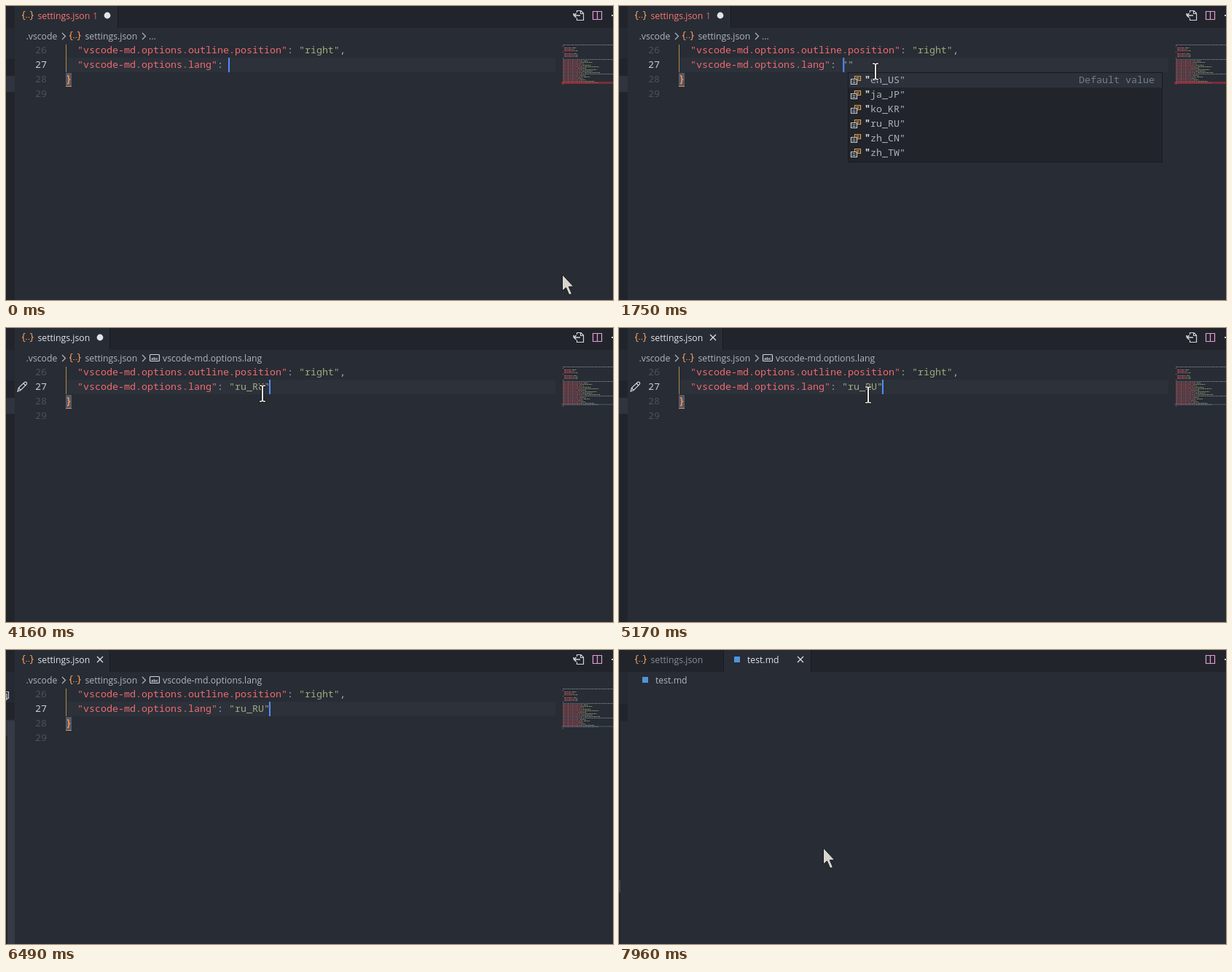
An HTML page that plays this animation: 833 px wide and 404 px high, repeating every 8 s.

```html
<!DOCTYPE html>
<html lang="en">
<head>
<meta charset="utf-8">
<title>Editor settings</title>
<style>
  html, body { margin: 0; width: 100%; height: 100%; overflow: hidden; background: #282c34; }
  svg { display: block; width: 100vw; height: 100vh; }
  text { white-space: pre; }
  .ui { font: 12.25px "Open Sans", "Noto Sans", sans-serif; fill: #b0b6c1; }
  .code { font: 500 13.333px "Noto Sans Mono", "DejaVu Sans Mono", monospace; fill: #abb2bf; }
  .key { fill: #ef6b70; }
  .str { fill: #9dab7e; }
  .num { fill: #495162; }
  .tab { fill: #e2e4e8; }
  .italic { font-style: italic; }
  .line { fill: none; stroke-width: 1.2; }
</style>
</head>
<body>
<svg viewBox="0 0 833 404" preserveAspectRatio="none">
  <defs>
    <g id="braces" class="line" stroke="#ee9a5c" stroke-width="1.5">
      <path d="M5 -5.5H4Q2.5 -5.5 2.5 -4V-2Q2.5 0 .5 0Q2.5 0 2.5 2V4Q2.5 5.5 4 5.5H5M11.5 -5.5H12.5Q14 -5.5 14 -4V-2Q14 0 16 0Q14 0 14 2V4Q14 5.5 12.5 5.5H11.5"/>
      <path d="M5.8 2.5H7.3M9.2 2.5H10.7"/>
    </g>
    <path id="chevron" class="line" stroke="#b0b6c1" d="M0 -4.5L4.5 0L0 4.5"/>
    <path id="close" class="line" stroke="#e2e4e8" d="M-4 -4L4 4M4 -4L-4 4"/>
    <rect id="fileMark" x="-4" y="-4" width="8" height="8" fill="#4f94dc"/>
    <g id="valueIcon" class="line">
      <path stroke="#e5a04c" d="M5.5 .5H13.5V6.5H5.5ZM7.5 2.5H11.5M7.5 4.5H11.5"/>
      <path fill="#21252b" stroke="#c5c8ce" d="M.5 4.5H8.5V11.5H.5ZM2.5 7H6.5M2.5 9.5H6.5"/>
    </g>
  </defs>

  <rect width="833" height="404" fill="#282c34"/>
  <rect width="833" height="30" fill="#21252b"/>

  <!-- side bar edge -->
  <rect y="30" width="12" height="44" fill="#252931"/>
  <rect y="74" width="12" height="24" fill="#21252b"/>
  <g data-on="0-7190">
    <rect y="73" width="12" height="1" fill="#1e2127"/>
    <rect y="96" width="12" height="308" fill="#21252b"/>
    <rect y="96" width="12" height="22" fill="#2f343e"/>
  </g>
  <g data-on="7190-8000">
    <rect y="98" width="2" height="306" fill="#21252b"/>
    <rect y="316" width="2" height="17" fill="#3a404b"/>
  </g>
  <rect id="slider" x="2" y="98" width="10" height="306" fill="#353a45"/>
  <path data-on="5870-7490" class="line" stroke="#c5c8ce" d="M0 57.5H3.5V66.5H0M0 60.5H1V68.5H0"/>

  <!-- title bar actions -->
  <g data-on="0-7190" class="line" stroke="#d0d3d9">
    <path d="M783.5 9V6.5H789L792.5 10V19.5H783.5V16.5M788.5 6.5V10.5H792.5"/>
    <path stroke-width="1.6" d="M788 13H780Q779 13 779 10M782.5 10L779.5 13L782.5 16"/>
  </g>
  <path class="line" stroke="#e59bd2" d="M805.5 7.5H817.5V18.5H805.5ZM811.5 7.5V18.5"/>
  <rect x="831" y="12" width="2" height="2" fill="#c9ccd2"/>

  <!-- settings.json tab -->
  <g data-on="0-4080">
    <rect x="12" width="141" height="30" fill="#282c34"/>
    <rect x="153" width="1" height="30" fill="#181a1f"/>
    <circle cx="139" cy="13" r="4.4" fill="#e2e4e8"/>
  </g>
  <g data-on="4080-7190">
    <rect x="12" width="130" height="30" fill="#282c34"/>
    <rect x="142" width="1" height="30" fill="#181a1f"/>
    <circle data-on="4080-5100" cx="129" cy="13" r="4.4" fill="#e2e4e8"/>
    <use data-on="5100-7190" href="#close" x="129" y="13"/>
  </g>
  <use href="#braces" x="21.5" y="13"/>
  <g id="tabTitle">
    <text class="ui" x="43.5" y="18" style="fill:inherit">settings.json</text>
    <text data-on="0-4080" class="ui" x="119" y="18" style="fill:inherit" opacity=".8">1</text>
  </g>

  <!-- test.md view -->
  <g data-on="7190-8000">
    <rect x="143" width="1" height="30" fill="#181a1f"/>
    <rect x="144" width="119" height="30" fill="#282c34"/>
    <rect x="263" width="1" height="30" fill="#181a1f"/>
    <use href="#fileMark" x="162" y="13"/>
    <g data-on="7190-7270"><text class="ui tab italic" x="176" y="18">test.md</text></g>
    <g data-on="7270-8000"><text class="ui tab" x="176" y="18">test.md</text></g>
    <use href="#close" x="249" y="13"/>
    <use href="#fileMark" x="36" y="41"/>
    <text class="ui" x="50" y="46">test.md</text>
  </g>

  <!-- settings.json view -->
  <g data-on="0-7190">
    <text class="ui" x="27.5" y="46">.vscode</text>
    <use href="#chevron" x="77" y="41.5"/>
    <use href="#braces" x="86.5" y="41"/>
    <text class="ui" x="108.5" y="46">settings.json</text>
    <use href="#chevron" x="187" y="41.5"/>
    <text data-on="0-2000" class="ui" x="196" y="46">...</text>
    <g data-on="2000-7190">
      <rect class="line" x="197.5" y="36.5" width="13" height="9" rx="1" stroke="#d0d3d9"/>
      <text x="199" y="43.5" style="font:bold 5.5px 'Open Sans',sans-serif" fill="#d0d3d9">abc</text>
      <text class="ui" x="215" y="46">vscode-md.options.lang</text>
    </g>

    <rect x="83" y="71" width="671" height="20" fill="#2c313a"/>
    <rect x="82" y="53" width="1" height="38" fill="#b08a4c"/>
    <rect x="82" y="92" width="8" height="18" fill="#515a6b"/>
    <rect x="82" y="110" width="8" height="1" fill="#e08a4a"/>
    <g class="code">
      <g class="num">
        <text x="40" y="65">26</text>
        <text x="40" y="85" fill="#c8ccd4">27</text>
        <text x="40" y="105">28</text>
        <text x="40" y="125">29</text>
      </g>
      <text x="98" y="65"><tspan class="key">"vscode-md.options.outline.position"</tspan>: <tspan class="str">"right"</tspan>,</text>
      <text x="98" y="85"><tspan class="key">"vscode-md.options.lang"</tspan>: <tspan id="value" class="str"></tspan></text>
      <text x="82" y="105" fill="#fa8c4a" font-weight="700">}</text>
    </g>
    <path id="squiggle" data-on="2000-4080" class="line" stroke="#c9a564"/>
    <path data-on="2000-5400" class="line" stroke="#d0d3d9" stroke-width="1.4"
      d="M16 87L17.5 82L25.5 74.5Q27 73.5 28.3 75Q29.2 76.5 28 77.7L20 85.5ZM24 76L26.8 79M17.5 82L20 85.5"/>

    <g id="minimap" opacity=".75"></g>
    <rect data-on="0-2150" x="762" y="104" width="71" height="3" fill="#a3303c" opacity=".65"/>
    <rect data-on="2150-7190" x="762" y="104" width="71" height="2" fill="#4a6283" opacity=".45"/>
    <rect data-on="2150-4080" x="790" y="104" width="4" height="2" fill="#d6bd72"/>
    <g id="popups"></g>
    <rect id="caret" y="71" width="2" height="20" fill="#528bff"/>
  </g>

  <g id="mouse" stroke="#15171b">
    <path id="ibeam" fill="#f0ece4" d="M-4.5 -12H-1L0 -11L1 -12H4.5V-9.5H1.5V9.5H4.5V12H1L0 11L-1 12H-4.5V9.5H-1.5V-9.5H-4.5Z"/>
    <path id="arrow" fill="#d8d4cd" d="M0 0V22.5L5 18L9.3 28L13 26.4L8.8 16.8H15.5Z"/>
  </g>
</svg>
<script>
const LOOP = 8000, CHAR = 8, VALUE_X = 306;
const $ = id => document.getElementById(id);
const clamp = v => Math.min(1, Math.max(0, v));
const smooth = v => v * v * (3 - 2 * v);

function add(parent, tag, attrs, content = '') {
  const el = document.createElementNS('http://www.w3.org/2000/svg', tag);
  for (const name in attrs) el.setAttribute(name, attrs[name]);
  el.textContent = content;
  parent.append(el);
  return el;
}

// Suggestion list at the caret; the matched start of the first entry is bold.
function popup(typed, locales, on) {
  const x = VALUE_X + CHAR * (typed + 1);
  const g = add($('popups'), 'g', { class: 'code', 'data-on': on });
  add(g, 'rect', { x: x + .5, y: 91.5, width: 431, height: locales.length * 20 + 3, fill: '#21252b', stroke: '#181a1f' });
  add(g, 'rect', { x: x + 1, y: 92, width: 430, height: 20, fill: '#2c313a' });
  locales.forEach((locale, i) => {
    const entry = `"${locale}"`, bold = i === 0 ? typed + 1 : 1;
    add(g, 'use', { href: '#valueIcon', x: x + 4, y: 96 + 20 * i });
    const label = add(g, 'text', { x: x + 23, y: 106 + 20 * i });
    add(label, 'tspan', { 'font-weight': 700, fill: '#d7dae0' }, entry.slice(0, bold));
    add(label, 'tspan', {}, entry.slice(bold));
  });
  if (!typed) add(g, 'text', { x: x + 317, y: 106, fill: '#767d89' }, 'Default value');
}
popup(0, ['en_US', 'ja_JP', 'ko_KR', 'ru_RU', 'zh_CN', 'zh_TW'], '1750-2300');
popup(1, ['ru_RU', 'ko_KR'], '2300-2700');
popup(2, ['ru_RU'], '2700-3770');

// Minimap: short nested blocks above, then longer settings, split by comments.
function drawMinimap() {
  let seed = 7;
  const random = () => (seed = seed * 16807 % 2147483647) / 2147483647;
  const dash = (x, y, length, stroke) => add($('minimap'), 'path',
    { d: `M${x} ${y}h${length}`, stroke, 'stroke-dasharray': '3 .5 2 .6' });
  for (let row = 0; row < 28; row++) {
    const y = 53.5 + 2 * row, nested = row < 10, isBrace = row % 27 === 0 || nested && row % 4 === 1;
    if (row % 10 === 0) dash(764, y, 69, '#7c8594');
    else if (isBrace) dash(764, y, 1, '#e08a4a');
    else {
      const x = nested ? 766 : 764, length = nested ? 10 + random() * 6 : 18 + random() * 12;
      dash(x, y, length, '#d8666c');
      dash(x + length + 1, y, random() * (nested ? 6 : 24), '#98a67c');
    }
  }
}
drawMinimap();

const edits = [
  { at: 0, text: '', column: 0 },
  { at: 1750, text: '""', column: 1 },
  { at: 2300, text: '"r"', column: 2 },
  { at: 2700, text: '"ru"', column: 3 },
  { at: 3770, text: '"ru_RU"', column: 7 },
];

function drawValue(t) {
  const index = edits.findLastIndex(e => e.at <= t);
  const edit = edits[index], before = edits[index - 1] ?? edit;
  $('value').textContent = edit.text;
  $('squiggle').setAttribute('d', `M${VALUE_X} 90` + 'l2 -2l2 2'.repeat(edit.text.length * 2));

  // The caret glides to its new column and blinks, starting visible after each edit.
  const glide = clamp((t - edit.at + 30) / 110);
  const column = before.column + (edit.column - before.column) * glide;
  $('caret').setAttribute('x', VALUE_X - 1 + CHAR * column);
  const HALF_BLINK = 625, age = t - edit.at + (index ? 0 : HALF_BLINK);
  const fade = clamp(age % HALF_BLINK / 75), visible = Math.floor(age / HALF_BLINK) % 2 === 0;
  $('caret').setAttribute('opacity', age < HALF_BLINK ? 1 : visible ? fade : 1 - fade);
}

const titleColor = t => t < 2150 ? '#f7776f' : t < 4080 ? '#dfa060' : t < 7190 ? '#e2e4e8' : '#858c99';

// Each move follows a quadratic curve and rests at its end.
const moves = [
  { start: 70, end: 740, from: [763.5, 369], bend: [790, 40], to: [352, 90] },
  { start: 5020, end: 5690, from: [352, 90], bend: [310, 95], to: [123, 183] },
  { start: 7490, end: 7920, from: [0, 372], bend: [120, 340], to: [280.5, 272] },
];

function drawMouse(t) {
  const sampled = t - (t + 7) % 77;
  const move = moves.findLast(m => m.start <= t) ?? moves[0];
  const u = smooth(clamp((sampled - move.start) / (move.end - move.start)));
  const [x, y] = move.from.map((v, i) =>
    v * (1 - u) ** 2 + move.bend[i] * 2 * u * (1 - u) + move.to[i] * u ** 2);
  const overText = t < 7190 && x < 754, away = t >= 5790 && t < 7490;
  $('mouse').setAttribute('transform', `translate(${x} ${y})`);
  $('mouse').style.display = away ? 'none' : '';
  $('ibeam').style.display = overText ? '' : 'none';
  $('arrow').style.display = overText ? 'none' : '';
}

const switches = [...document.querySelectorAll('[data-on]')]
  .map(el => [el, ...el.dataset.on.split('-').map(Number)]);

function draw(t) {
  for (const [el, from, to] of switches) el.style.display = t >= from && t < to ? '' : 'none';
  $('tabTitle').style.fill = titleColor(t);
  $('slider').setAttribute('opacity', clamp((t - 5790) / 400) * clamp((7900 - t) / 400));
  drawValue(t);
  drawMouse(t);
}

const begin = performance.now();
function tick() {
  draw((performance.now() - begin) % LOOP);
  requestAnimationFrame(tick);
}
tick();
</script>
</body>
</html>
```
